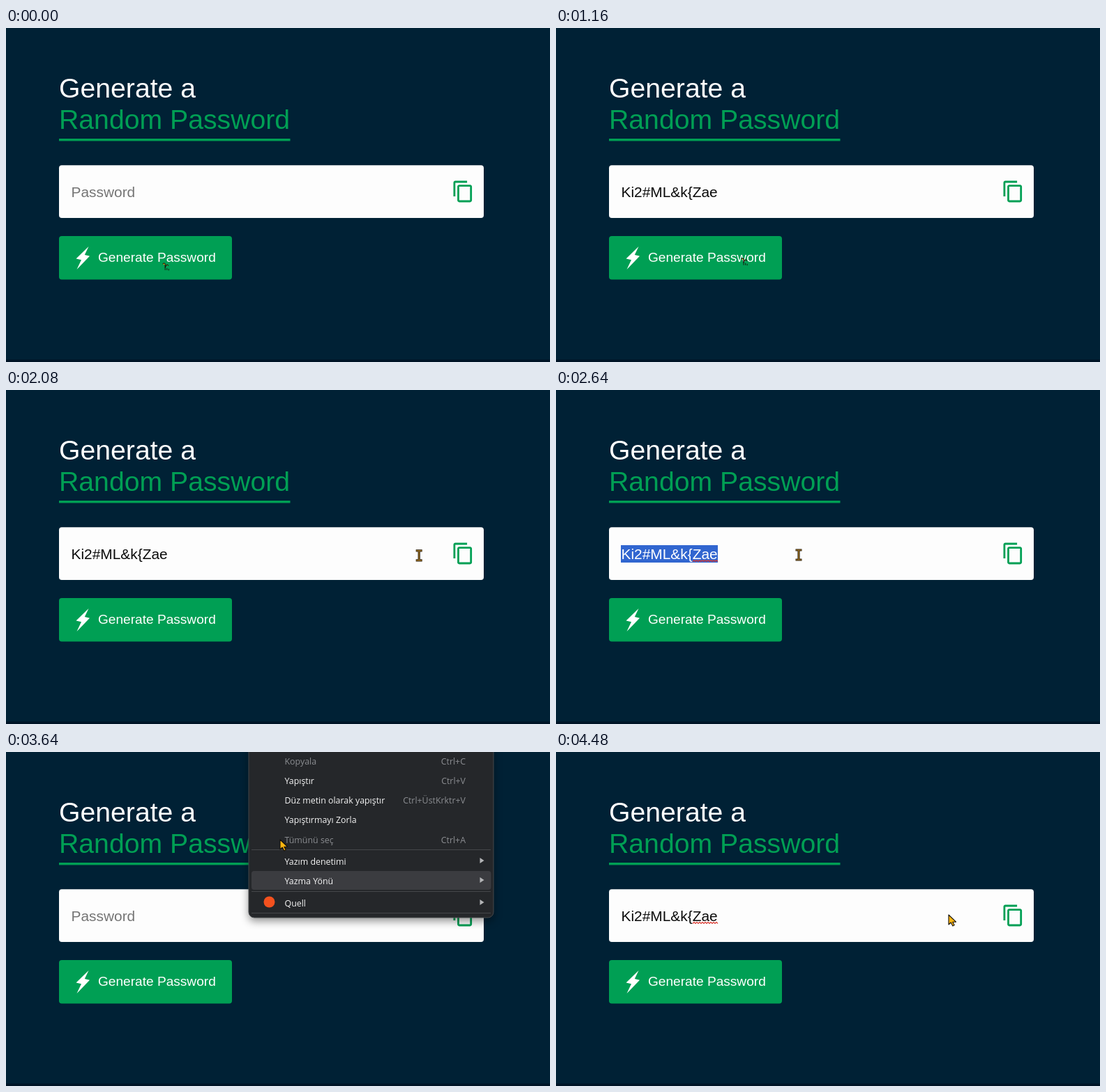
Write an HTML page that moves like this. It is 780x480 px and loops after 4520 ms.

```html
<!DOCTYPE html>
<html lang="en">
<head>
<meta charset="utf-8">
<title>Random password generator</title>
<style>
html, body { margin: 0; width: 100%; height: 100%; overflow: hidden; background: #002135; }
svg { display: block; width: 780px; height: 480px; font-family: "Liberation Sans", Arial, sans-serif; }
.title { font-size: 39.2px; }
.field { font-size: 20.9px; white-space: pre; }
.menu { font: 12.4px "Open Sans", "Noto Sans", sans-serif; fill: #f4f4f4; }
.menu .dim { fill: #8b8d91; }
#panel { filter: drop-shadow(0 5px 6px rgba(0, 0, 0, .4)); }
</style>
</head>
<body>
<svg viewBox="0 0 780 480">
  <defs>
    <clipPath id="menuClip"><path d="M348 0H699V230a8 8 0 0 1-8 8H356a8 8 0 0 1-8-8z"/></clipPath>
  </defs>
  <rect width="780" height="480" fill="#002135"/>
  <rect y="476.5" width="780" height="3.5" fill="#001426"/>
  <text class="title" x="76" y="99.5" fill="#fff">Generate a</text>
  <text class="title" x="76" y="144.7" fill="#009f54">Random Password</text>
  <rect x="76" y="159" width="331.5" height="3.4" fill="#009f54"/>

  <rect x="76" y="197.3" width="609" height="75.7" rx="4" fill="#fdfdfd"/>
  <rect id="selection" x="93" y="223" width="139" height="25" fill="#3166d0"/>
  <text id="password" class="field" x="93.5" y="242.8"></text>
  <path id="squiggle" fill="none" stroke="#d9352c" stroke-width="1.1"/>
  <path transform="translate(638.7 218.2) scale(1.4)" fill="#009f54"
    d="M16 1H4c-1.1 0-2 .9-2 2v14h2V3h12zM19 5H8c-1.1 0-2 .9-2 2v14c0 1.1.9 2 2 2h11c1.1 0 2-.9 2-2V7c0-1.1-.9-2-2-2zm0 16H8V7h11z"/>

  <rect x="76" y="299" width="248" height="62.6" rx="4" fill="#009f54"/>
  <path d="M118.5 314L100.5 331.5L108 333.2L101.5 347L120 327.8L112.8 326z" fill="#fff"/>
  <text x="132" y="336.3" font-size="19.1" fill="#fff">Generate Password</text>

  <g id="menu" class="menu">
    <path id="panel" d="M348-20H699V230a8 8 0 0 1-8 8H356a8 8 0 0 1-8-8z" fill="#25272a" stroke="#45484b"/>
    <g clip-path="url(#menuClip)"><g id="items">
      <rect id="hover" x="352" width="343.5" height="27" rx="4" fill="#3b3c40"/>
    </g></g>
  </g>

  <g id="cursor" stroke="#15110a" stroke-width="1.1" stroke-linejoin="round" fill="#ffb711">
    <g id="hand">
      <path d="M-2 1.5Q-2 0-.5 0T1.2 1.5V6.5Q3-.1+6 3.7 6.7Q6.2 6 6.3 8Q8.7 7.4 8.6 10V13Q8.5 16 6.5 18H-.7Q-3 15.5-6 11.5Q-6.3 9-4 9.7L-2 11.5z"/>
      <path d="M1.2 6.5V10M3.8 7V10M6.3 8V10.5" fill="none" stroke-width=".9"/>
    </g>
    <path id="arrow" d="M0 0V14L3.3 11L5.8 16L8.2 14.8L5.8 10.2H10.5z"/>
    <g id="beam" fill="none">
      <path d="M-4.5-7H4.5M0-7V7M-4.5 7H4.5" stroke="#2b2110" stroke-width="3.2"/>
      <path d="M-4-7H4M0-7V7M-4 7H4" stroke="#b07d24" stroke-width="1.2"/>
    </g>
    <g id="hourglass">
      <path d="M12 2.5H21V4.5L17.8 9L21 13.5V15.5H12V13.5L15.2 9L12 4.5z"/>
      <path d="M11 2.5H22M11 15.5H22" stroke-width="2"/>
    </g>
  </g>
</svg>
<script>
const LOOP = 4520, STEP = 40;
const FIRST = "Og6~yVzKooIU", SECOND = "Ki2#ML&k{Zae";
const $ = id => document.getElementById(id);
const clamp = v => Math.max(0, Math.min(1, v));
const show = (id, on) => $(id).setAttribute("display", on ? "inline" : "none");

function add(name, attrs, text = "") {
  const el = document.createElementNS("http://www.w3.org/2000/svg", name);
  for (const key in attrs) el.setAttribute(key, attrs[key]);
  el.textContent = text;
  $("items").append(el);
}

// label, centre y, shortcut ("›" opens a submenu), disabled
const rows = [
  ["Kopyala", 13, "Ctrl+C", true],
  ["Yapıştır", 41, "Ctrl+V"],
  ["Düz metin olarak yapıştır", 69, "Ctrl+ÜstKrktr+V"],
  ["Yapıştırmayı Zorla", 97],
  ["Tümünü seç", 126, "Ctrl+A", true],
  ["Yazım denetimi", 157, "›"],
  ["Yazma Yönü", 185, "›"],
  ["Quell", 217, "›"],
  ["İncele", 247.5]
];
for (const [label, y, extra, disabled] of rows) {
  add("text", { x: 399.5, y: y + 4.5, class: disabled ? "dim" : "" }, label);
  if (extra === "›") add("path", { d: `M679.5 ${y - 5}l6 4l-6 4z`, fill: "#b4b5b7" });
  else if (extra) add("text", { x: 659, y: y + 4.5, class: "dim", "text-anchor": "end" }, extra);
}
for (const y of [140.5, 200.5, 231.5])
  add("path", { d: `M352 ${y}H695`, stroke: "#45474a" });
add("circle", { cx: 377.5, cy: 215.5, r: 8, fill: "#f4511e" });

let wave = "M196 246.5";
for (let i = 0; i < 18; i++) wave += `l2 ${i % 2 ? 2 : -2}`;
$("squiggle").setAttribute("d", wave);

// time, x, y of the pointer's hot spot
const path = [
  [0, 227, 338], [1140, 227, 338], [1400, 757, 245], [1560, 662, 238],
  [2000, 662, 238], [2360, 348, 237], [3000, 348, 237], [3040, 348, 238],
  [3400, 348, 238], [3560, 374, 188], [3640, 393, 126], [3800, 412, 42],
  [4080, 412, 42], [4400, 563, 234], [LOOP, 563, 234]
];
function pointer(t) {
  const i = path.findIndex(key => key[0] > t);
  const [t0, x0, y0] = path[i - 1], [t1, x1, y1] = path[i];
  const k = (t - t0) / (t1 - t0);
  return [x0 + (x1 - x0) * k, y0 + (y1 - y0) * k];
}

function pointerKind(t, x, y) {
  if (t >= 3040) return "arrow";
  if (y > 299 && x < 324 || x > 638 && x < 671 && y < 273) return "hand";
  return y > 197 && y < 273 && x < 685 ? "beam" : "arrow";
}

function passwordAt(t) {
  if (t < 320 || t >= 2800 && t < 4000) return "";
  return t < 880 ? FIRST : SECOND;
}

function drawMenu(t) {
  const opening = clamp((t - 3080) / 240);
  const closing = clamp((4120 - t) / 120);
  const visible = t > 3080 && t < 4120;
  show("menu", visible);
  if (!visible) return;
  $("panel").setAttribute("opacity", opening * closing);
  $("items").setAttribute("opacity", Math.min(1, opening * 2) * closing);
  $("items").setAttribute("transform", `translate(0 ${-18.6 * (1 - opening)})`);
  const [x, y] = pointer(t - 60);
  const row = rows.find(r => !r[3] && Math.abs(r[1] - y) < 14);
  show("hover", row && x > 352);
  if (row) $("hover").setAttribute("y", row[1] - 14);
}

function draw(now) {
  const t = Math.floor(now % LOOP / STEP) * STEP;
  const value = passwordAt(t), selected = t >= 2480 && t < 2800;
  $("password").textContent = value || "Password";
  $("password").setAttribute("fill", !value ? "#757575" : selected ? "#fff" : "#0b0b0b");
  show("selection", selected);
  show("squiggle", value && t >= 2440);
  drawMenu(t);

  const [x, y] = pointer(t), kind = pointerKind(t, x, y);
  $("cursor").setAttribute("transform", `translate(${x} ${y})`);
  for (const id of ["hand", "arrow", "beam"]) show(id, id === kind);
  show("hourglass", t >= 3040 && t < 3240);
}

let start;
function tick(now) {
  start ??= now;
  draw(now - start);
  requestAnimationFrame(tick);
}
draw(0);
requestAnimationFrame(tick);
</script>
</body>
</html>
```
